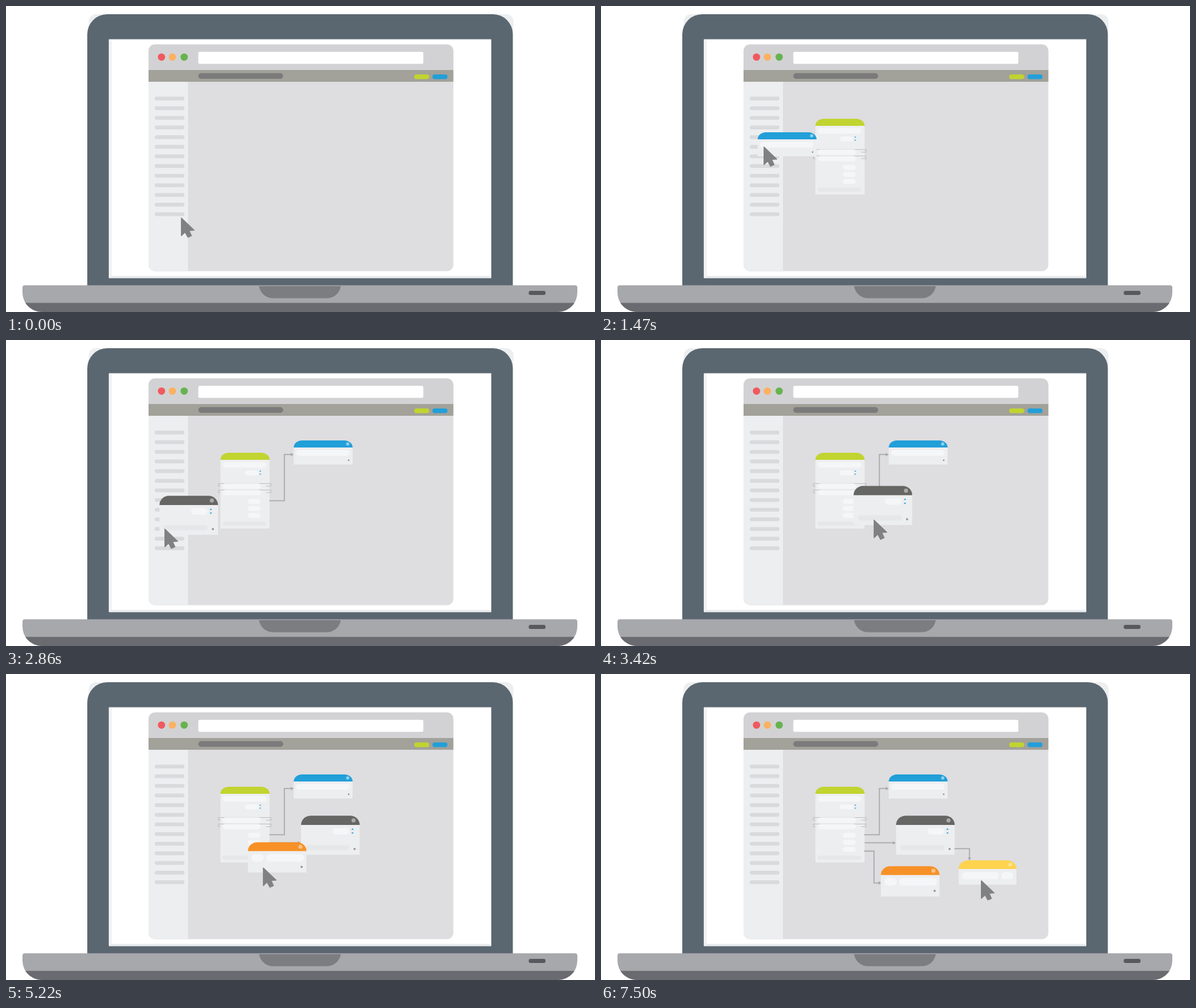
An HTML page for the animation above (8.33 s loop, 1000x521 px).

```html
<!DOCTYPE html>
<html lang="en">
<head>
<meta charset="utf-8">
<title>Flow builder on a laptop</title>
<style>
  html, body { margin: 0; width: 100%; height: 100%; overflow: hidden; background: #fff; }
  svg { display: block; width: 100%; height: 100%; }
</style>
</head>
<body>
<svg id="stage" viewBox="0 0 1000 521"></svg>
<script>
const LOOP = 8330, STEP = 80;
const BODY = '#edeef0', PILL = '#f5f6f8', BAR = '#e6e7e9', WIRE = '#a9a9ac', BLUE = '#219fd9';

const rect = (x, y, w, h, fill, rx = 0) =>
  `<rect x="${x}" y="${y}" width="${w}" height="${h}" rx="${rx}" fill="${fill}"/>`;
const pill = (x, y, w, h, fill = PILL) => rect(x, y, w, h, fill, h / 2);
const dot = (x, y, r, fill) => `<circle cx="${x}" cy="${y}" r="${r}" fill="${fill}"/>`;
const shape = (d, fill) => `<path d="${d}" fill="${fill}"/>`;
const line = (d, width, color) =>
  `<path d="${d}" fill="none" stroke="${color}" stroke-width="${width}"/>`;
const group = (id, content) => `<g id="${id}">${content}</g>`;
const spinner = (x, y, s) =>
  shape(`M${x - 2 * s} ${y + 2.6 * s}l${2 * s} ${-2.4 * s}l${2 * s} ${2.4 * s}z` +
        `M${x - 2 * s} ${y + 7 * s}h${4 * s}l${-2 * s} ${2.4 * s}z`, BLUE);

// Card with a rounded header, drawn from its own top left corner
const card = (id, w, h, head, r, color, content) => group(id,
  rect(0, head - 0.5, w, h - head + 0.5, BODY) +
  shape(`M0 ${head}A${r} ${head} 0 0 1 ${r} 0H${w - r}A${r} ${head} 0 0 1 ${w} ${head}Z`, color) +
  content);

const wire = (id, d, arrow) => group(id, line(d, 1.8, WIRE) + shape(arrow, WIRE));
const arrowRight = (x, y) => `M${x - 5} ${y - 3}L${x} ${y}L${x - 5} ${y + 3}Z`;

const laptop =
  rect(140.5, 14, 721, 40, '#eceef0', 12) +
  shape('M138 476V48A34 34 0 0 1 172 14H826.500A34 34 0 0 1 860.500 48V476Z', '#5b6770') +
  rect(174.5, 56.5, 649.5, 407, '#e9ecee', 1) +
  rect(175.5, 57.5, 1.5, 405, '#fff') +
  rect(179, 57.5, 644, 402, '#fff') +
  shape('M28 479.500a4 4 0 0 1 4-4H966a4 4 0 0 1 4 4V488a33 33 0 0 1-33 33H61a33 33 0 0 1-33-33Z', '#a7a8ac') +
  shape('M33 505.500H965A33 33 0 0 1 937 521H61A33 33 0 0 1 33 505.500Z', '#6a6b70') +
  shape('M429.500 477H568.500C566 490 556 497.500 544 497.500H454C442 497.500 432 490 429.500 477Z', '#7c7d81') +
  rect(887.5, 485, 28.5, 7, '#58595e', 3);

const browser =
  rect(242, 65.5, 517.5, 386, '#dedde0', 11) +
  shape('M242 109V76.500a11 11 0 0 1 11-11H748.500a11 11 0 0 1 11 11V109Z', '#d2d2d4') +
  shape('M242 129H309V451.500H253a11 11 0 0 1-11-11Z', BODY) +
  rect(242, 109, 517.5, 20, '#a2a19a') +
  dot(264, 87, 6.2, '#ef5a5f') + dot(282.5, 87, 6.2, '#fbb161') + dot(302.5, 87, 6.2, '#67b34f') +
  rect(326.5, 78, 382, 20.5, '#fff', 2.5) +
  pill(326.5, 114.3, 144, 9.7, '#7b7b7c') +
  pill(693, 116.4, 25.5, 8, '#c1d42f') + pill(724, 116.4, 25.5, 8, BLUE) +
  Array.from({ length: 13 }, (_, i) => pill(252.5, 154.3 + 16.42 * i, 50.5, 6.5, '#d9dadc')).join('');

const bracket = y => line(`M0 ${y + 4.5}H-3.500V${y}H86V${y + 4.5}H77.500`, 1, '#bbbcbe') +
  pill(4, y - 0.2, 65, 9);

const cards =
  card('green', 83.5, 129, 12, 14, '#c1d42f',
    pill(4, 15.5, 74, 10) + pill(41.5, 30, 23, 8.7) + spinner(67.7, 29.8, 0.85) +
    bracket(52.4) + bracket(63.4) +
    [78.5, 90.5, 102.5].map(y => pill(46.5, y, 22, 8.5)).join('') +
    pill(3.5, 117.3, 74, 6.7, BAR)) +
  wire('blueWire', 'M447 273.600H472.600V194.900H485', arrowRight(488.5, 194.9)) +
  card('blue', 100, 41, 12, 14, BLUE,
    dot(91.7, 6, 2.8, '#90cfec') + pill(4, 16, 91, 10) + dot(93.3, 33.7, 1.3, '#87888a')) +
  wire('darkWire', 'M447.500 287.400H497', arrowRight(500.5, 287.6)) +
  card('dark', 99.5, 66.5, 15.7, 16, '#666665',
    dot(89, 8, 3.5, '#a9a9a8') + pill(53.5, 21, 28, 11) + spinner(87.3, 21.2, 1.05) +
    pill(7, 50, 75, 9, BAR) + dot(90.8, 56.6, 1.9, '#98999b')) +
  wire('orangeWire', 'M447 301.500H463.500V355.800H473', arrowRight(476, 355.8)) +
  card('orange', 99.5, 51.5, 15, 16, '#f79127',
    dot(89.2, 7.8, 3.5, '#fbc184') + pill(5.8, 20, 21, 13) + pill(30.8, 20, 64.5, 13) +
    dot(91.2, 42, 1.9, '#98999b')) +
  wire('yellowWire', 'M600 297.400H625.600V314', 'M622.600 312.500H628.600L625.600 317.500Z') +
  card('yellow', 98, 41.5, 14.8, 16, '#ffd34e',
    dot(87.5, 7.2, 3.2, '#ffe590') + pill(5.5, 20, 63, 12.3) + pill(72.3, 20, 20.7, 12.3));

const cursor = group('cursor',
  '<path d="M.6.800V31.200L7 25.300L11.800 34L18 31.200L14 22.300L22.500 21.800Z" ' +
  'fill="#808183" stroke="#808183" stroke-width="1.200" stroke-linejoin="round"/>');

const stage = document.getElementById('stage');
stage.innerHTML = laptop + browser + cards + cursor;
const parts = Object.fromEntries([...stage.querySelectorAll('g')].map(g => [g.id, g]));

// Each drag: [part, appears at, moves from, steps, start, end]
const drags = [
  ['green', 80, 250, 5, [262, 265], [364, 192]],
  ['blue', 1470, 1550, 6, [266, 215], [488.5, 171]],
  ['dark', 2860, 2940, 10, [260.5, 265.3], [501, 241.2]],
  ['orange', 4570, 4740, 10, [260.3, 191.3], [475.2, 327.2]],
  ['yellow', 6680, 6930, 6, [262, 311], [607.3, 317.2]],
];
const wires = { blueWire: 2120, darkWire: 3830, orangeWire: 5620, yellowWire: 7500 };

// Cursor legs: [moves from, steps, end]
const cursorStart = [297, 360];
const cursorLegs = [
  [250, 5, [399, 287]], [650, 4, [276, 239]],
  [1550, 6, [528, 201]], [2370, 3, [269, 321]],
  [2940, 10, [546, 299]], [4000, 5, [271, 233]],
  [4740, 10, [507, 370.5]], [5540, 5, [507, 374]],
  [6190, 4, [270.7, 339.3]], [6930, 6, [645, 351]],
];

const progress = (t, from, steps) =>
  Math.min(Math.max(Math.floor((t - from) / STEP) + 1, 0), steps) / steps;
const mix = (a, b, k) => a.map((v, i) => v + (b[i] - v) * k);
const place = (id, [x, y]) => parts[id].setAttribute('transform', `translate(${x} ${y})`);
const show = (id, on) => parts[id].setAttribute('visibility', on ? 'visible' : 'hidden');

function render(t) {
  for (const [id, appears, from, steps, start, end] of drags) {
    show(id, t >= appears);
    place(id, mix(start, end, progress(t, from, steps)));
  }
  for (const id in wires) show(id, t >= wires[id]);
  place('cursor', cursorLegs.reduce(
    (pos, [from, steps, end]) => mix(pos, end, progress(t, from, steps)), cursorStart));
}

const began = performance.now();
function tick() {
  render((performance.now() - began) % LOOP);
  requestAnimationFrame(tick);
}
tick();
</script>
</body>
</html>
```
